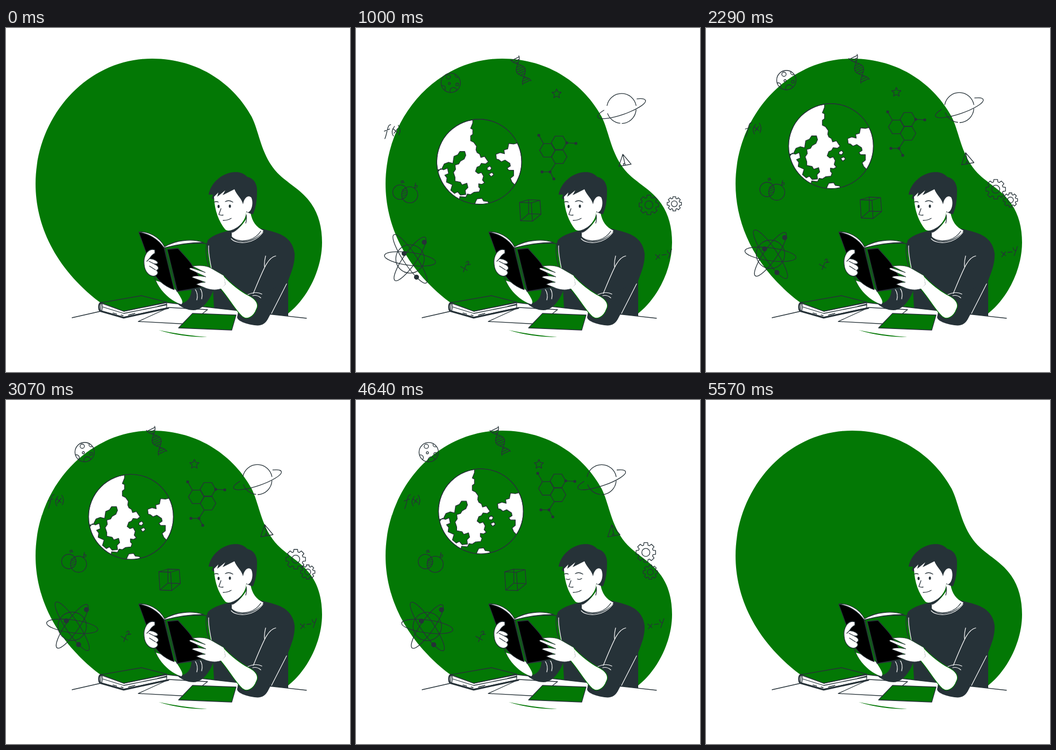
Recreate the animation shown at these times as an HTML page. Size 640 by 640 pixels, loop 5930 ms.

```html
<!DOCTYPE html>
<html lang="en">
<head>
<meta charset="utf-8">
<title>Reading about science</title>
<style>
  html, body { margin: 0; width: 100%; height: 100%; overflow: hidden; background: #fff; }
  svg { display: block; width: 100%; height: 100%; }
  .line { fill: none; stroke: #263238; stroke-width: 1.3; stroke-linecap: round; stroke-linejoin: round; }
  .thin { fill: none; stroke: #fff; stroke-width: 1.2; stroke-linecap: round; }
  .green { fill: #037805; }
  .dark { fill: #263238; }
  .white { fill: #fff; }
  .edge { stroke: #263238; stroke-width: 1.3; stroke-linejoin: round; }
</style>
</head>
<body>
<svg viewBox="0 0 640 640">
  <defs>
    <clipPath id="globeClip"><circle r="79"/></clipPath>
    <clipPath id="moonClip"><circle r="18"/></clipPath>
    <clipPath id="lensClip"><circle r="13.5"/></clipPath>
  </defs>

  <path class="green" d="M177 512C90 447 55 365 55 290C55 165 150 57 272 57C360 57 425 106 457 165C471 193 474 232 500 264C520 288 549 299 568 327C582 347 588 372 588 399C588 447 563 501 525 531L520 535 300 511Z"/>
  <path class="green" d="M284 562Q325 571 375 575Q325 575 284 562Z"/>

  <g id="items" class="line"></g>

  <g id="table">
    <path class="line" d="M123 539L176 527M300 511L559 540"/>
    <path class="white edge" d="M246 546L303 520 375 524 340 551Z"/>
    <path class="green edge" d="M347 531L428 534 420 562 321 558Z"/>
    <path class="white edge" d="M177 512L219 527 299 511V521L219 538 176 526Z"/>
    <path class="green edge" d="M177 511L252 498 299 510 219 527Z"/>
    <path class="line" d="M180 519L219 531 299 515M282 518L298 514M199 530L206 532M214 534L218 535M228 534L240 531"/>
    <path class="line" style="stroke-width:3" d="M178 511Q173 511 173 519T177 527L219 539 302 521"/>
    <path class="line" d="M178 511Q181 518 178 526"/>
  </g>

  <g id="man">
    <path class="dark" d="M421 376C404 379 386 384 376 394C370 402 378 425 383 450L387 521 525 536V470C535 445 537 435 537 420C534 397 520 386 500 380C485 375 472 373 462 370Z"/>
    <path class="white" d="M447 340L455 344C458 360 465 370 479 377C467 397 430 404 420 388V380Q435 375 447 355Z"/>
    <path class="thin" d="M419 392C430 404 462 402 478 380"/>
    <path class="line" d="M419 388C431 401 461 398 474 378"/>
    <path class="dark" d="M377 310C380 291 400 268 428 268C440 268 447 275 449 277C463 280 468 293 467 306C467 325 463 340 459 347L446 342C444 356 437 374 421 381L388 320 383 317 385 310Z"/>
    <path class="white" d="M387 314L395 306 393 314 408 302 403 311 425 300C429 311 438 316 441 328C443 316 450 310 456 315C461 323 458 341 450 343L447 341C447 358 433 371 422 375Q413 379 408 375C396 360 388 340 387 314Z"/>
    <path class="line" d="M447 348Q448 357 446 363M387 324Q392 322 395 324M408 323Q415 319 422 324M400 336L396 347Q400 349 404 348M404 358Q413 358 419 354"/>
    <g id="eyes" class="dark"><ellipse cx="395.500" cy="332" rx="2" ry="3"/><ellipse cx="416.500" cy="331.500" rx="2" ry="3"/></g>
    <path id="lids" class="line" d="M391 333Q395 335 398 333M412 333Q416 335 420 332"/>

    <path class="dark" d="M320 514C336 514 346 503 346 485L364 480 386 487C380 505 366 525 349 525C337 525 327 520 320 514Z"/>
    <path class="green edge" d="M275 462C285 486 300 502 324 513Q344 511 346 486L313 488 283 460Z"/>
    <path class="white" d="M279 470C287 489 306 508 326 514C332 510 324 500 318 490C309 478 297 476 279 470Z"/>
    <path class="thin" d="M352 486Q358 495 355 506M360 483Q367 491 364 504M377 405C376 420 380 435 382 447"/>

    <path class="green edge" d="M295 408C320 402 350 400 373 401C370 420 376 445 382 452L371 483 318 490Z"/>
    <path class="white edge" d="M248 379C264 379 285 387 295 407C315 395 345 391 368 399C340 399 320 403 295 409Z"/>
    <path class="edge" d="M247 380C265 382 283 393 294 409L313 487C293 480 279 466 273 452Z"/>
    <path class="edge" d="M300 412L320 410C333 425 344 435 347 443L371 481 319 490Z"/>
    <path class="white edge" d="M277 413C264 408 255 425 257 440C258 453 267 464 277 461C283 459 284 454 280 451L283 449Q286 444 276 439L281 439Q286 435 273 430L267 429Q271 422 277 419Z"/>
    <path class="line" d="M267 429L262 434M276 439L266 434M278 450L267 443"/>

    <path class="dark" d="M449 497C462 487 474 491 476 493L522 474C514 494 498 520 489 538C483 551 475 555 462 553C447 551 430 545 430 538L433 522Z"/>
    <path class="white" style="stroke:#037805;stroke-width:1.3" d="M380 446L404 460C418 476 437 490 450 497C465 504 471 514 466 523C461 537 449 544 440 537C428 527 417 506 400 486Z"/>
    <path class="white edge" d="M347 443C360 441 372 442 380 446L404 460 408 477 400 485C390 489 377 487 367 482L354 477Q361 473 371 473L346 464Q349 459 372 463L342 449Q340 445 347 447L371 455Z" style="stroke-width:.8"/>
    <path d="M380 447L405 461 408 477 401 485 385 484Z" class="white"/>
    <path class="thin" d="M502 424C487 427 480 446 460 494M481 444C480 436 482 428 483 424M522 476L494 531M450 496Q465 489 476 495M459 498Q467 496 474 502"/>
  </g>
</svg>

<script>
const LOOP = 5930;
const layer = document.getElementById('items');
const eyes = document.getElementById('eyes');
const lids = document.getElementById('lids');
const clamp = v => Math.max(0, Math.min(1, v));
const path = (d, extra = '') => `<path d="${d}" ${extra}/>`;
const circle = (x, y, r, extra = '') => `<circle cx="${x}" cy="${y}" r="${r}" ${extra}/>`;
const dot = (x, y, r) => circle(x, y, r, 'class="dark"');

// Closed polygon from polar points: at(i) gives [radius, angle].
function polar(count, at, cx = 0, cy = 0) {
  const points = Array.from({ length: count }, (_, i) => {
    const [r, a] = at(i);
    return (cx + r * Math.cos(a)).toFixed(2) + ' ' + (cy + r * Math.sin(a)).toFixed(2);
  });
  return path('M' + points.join('L') + 'Z');
}

const hexagon = (x, y) => polar(6, i => [14.5, i * Math.PI / 3], x, y);

function gear(r, hole) {
  const offsets = [-.29, -.19, .19, .29];
  return polar(32, i => [i % 4 % 3 ? r : r * .76, (i >> 2) * Math.PI / 4 + offsets[i % 4]]) + circle(0, 0, hole);
}

function helix() {
  let a = '', b = '', rungs = '';
  for (let s = -26; s <= 26; s++) {
    const w = -8.5 * Math.cos(Math.PI * s / 26);
    a += (a ? 'L' : 'M') + s + ' ' + w.toFixed(2);
    b += (b ? 'L' : 'M') + s + ' ' + (-w).toFixed(2);
    if (s % 4 === 0) rungs += `M${s} ${w.toFixed(2)}V${(-w).toFixed(2)}`;
  }
  return `<g transform="rotate(64)">${path(a + b + rungs)}</g>`;
}

const orbit = (r, angle) => `<ellipse rx="${r}" ry="12" transform="rotate(${angle})"/>`;

const globe = circle(0, 0, 79, 'fill="#fff"') + '<g clip-path="url(#globeClip)" class="green edge">' +
  path('M-12-82L-12-72-16-62-12-60-12-51-16-48-16-39-10-36-5-29-6-22-4-17 1-14 3-8 10-10 14-4 17 0 12 4 4 3 1 8-4 10-7 18-2 22 4 20 8 27 6 34 10 39 5 42-1 41-1 47 2 50 0 56-10 57-16 61-22 60-25 66-36 65-40 85H50L66 43 61 38 58 31 64 26 64 16 55 16 52 12 58 8 57 3 48-3 41 0 36-4 32-5 31-14 39-17 47-15 46-22 53-24 55-34 64-33 72-35 85-38 60-80Z') +
  path('M-82 16L-70 14-65 4-57 1-49 3-47-10-40-13-36-19-27-19-25-12-28-5-35-1-38 4-45 6-44 14-48 20-45 29-45 36-35 38-32 43-23 40-21 48-26 53-25 61-35 62-40 56-46 59-53 53-50 43-61 38-60 30-64 25-57 22-59 12-66 15-72 13-78 20Z') +
  path('M15 11L20 8 23 12 20 16 15 15ZM18 23L24 20 27 24 22 28ZM-9 82L-7 75-4 69 5 68 8 73 16 74 20 82Z', 'fill="#fff"') +
  '</g>' + circle(0, 0, 79);

const moon = circle(0, 0, 18) + '<g clip-path="url(#moonClip)">' + circle(-4.5, -11, 4) + circle(-2.5, 1, 2) +
  circle(12, 3, 2.6) + circle(12, -14, 4) + circle(-15, 10, 5) + circle(5, 15, 6.5) + '</g>';

const saturn = path('M-27-6A27.500 27.500 0 0 1 27-6M-26 9A27.500 27.500 0 0 0 -3 27M1 27.500A27.500 27.500 0 0 0 27 2') +
  '<g transform="rotate(-19)">' + path('M-47 0A47 11 0 0 0 47 0A47 11 0 0 0 33-8M-47 0A47 11 0 0 1-32-8') + '</g>';

const molecule = hexagon(37.5, 14) + hexagon(16, 28) + hexagon(38, 40) +
  path('M0 0L8.500 15M52 14L69 15M31 52.500L21 68H6M21 68L28 81') +
  dot(0, 0, 2) + dot(52, 14, 2) + dot(69, 15, 2) + dot(21, 68, 2) + dot(6, 68, 2) + dot(28, 81, 2);

const cube = path('M-20-15L2-14 4 20-18 19ZM-3-20L18-19 20 7-3 6ZM-20-15L-3-20M2-14L18-19M4 20L20 7M-18 19L-3 6');

const atom = circle(0, 0, 26.5) + orbit(48, 7.5) + orbit(54, 56) + orbit(49, -55) +
  dot(26.5, -31, 4) + dot(-11, -10, 4) + dot(12, 34, 4);

const venn = circle(0, 0, 13.5) + circle(18, 5, 15) +
  `<g clip-path="url(#lensClip)">${path('M4-4L14-9M3 0L14-5M3 4L14-1M4 8L14 3M5 12L14 7')}</g>` +
  path('M6-21Q1-22 2-18Q4-15 6-21Q5-17 8-18M29-17L27-8Q33-8 32-12Q30-14 28-11');

const items = [];
// early and rest are positions at 0.57 s and 1.57 s; drift is px/s along the main axis.
function add(markup, early, rest, drift, out, main = 0) {
  const node = document.createElementNS('http://www.w3.org/2000/svg', 'g');
  node.innerHTML = markup;
  layer.append(node);
  items.push({ node, early, rest, drift, out, main });
}

add(moon, [219.5, 119], [152.5, 97], -4.1, 5140);
add(helix(), [337, 88], [289, 76], -5.8, 5130);
add(polar(10, i => [i % 2 ? 4.2 : 9, i * Math.PI / 5 - Math.PI / 2]), [400.5, 132.5], [357.5, 119.5], -4.7, 5300);
add(saturn, [529, 155.5], [474.5, 148.5], -4.5, 5440);
add(path('M-3.500-11.500L-11 11 12 7ZL1 9M-2 9.500L-2.500 6 .5 5.500'), [521.5, 256], [488, 243.5], -2.1, 5480);
add(molecule, [347, 274], [338, 159.5], -4.9, 5390, 1);
add(cube, [351.5, 356], [309, 334.5], -3.1, 5410);
add(gear(18.5, 7.5), [564.5, 375.5], [539, 303.5], -4.9, 5540, 1);
add(gear(13.5, 5.5), [629, 350.5], [571, 320], -6.4, 5570);
add(path('M-15 1L-7 8M-7 1L-14 10M-3 2L5 1M7-7Q8 0 13-2M15-9L9 8'), [582.5, 437], [566, 415.5], -2.3, 5510);
add(path('M-8 0L4 7M2-3L-3 10M2-7Q5-12 7-8Q7-5 4-3L10-4'), [180, 458], [216, 439.5], 4.1, 5300);
add(atom, [71.5, 458], [117, 421], 4.1, 5270);
add(venn, [29.5, 322], [110.5, 300.5], 4.3, 5260);
add(path('M-2-13C-9-13-8 2-13 13M-14-1L-4-5M5-10Q-3 0 3 8M3-5L11 2M11-6L4 3M12-12Q18-3 13 6'), [39, 206], [83, 189], 5.8, 5220);
add(globe, [218.5, 298.5], [232.5, 222], -3.1, 5360, 1);

function draw(t) {
  const leave = clamp((t - 4050) / 1520);
  const mainShift = (clamp((1450 - t) / 1450) * 1450 / 880) ** 1.6 + 1.4 * leave ** 2 * (2.2 * leave - 1.2);
  const sideShift = (clamp((1400 - t) / 1400) * 1400 / 830) ** 2 + leave ** 5;
  for (const { node, early, rest, drift, out, main } of items) {
    const [x, y] = rest.map((p, axis) => axis === main
      ? p + drift * (t - 1570) / 1000 + (early[axis] - p + drift) * mainShift
      : p + (early[axis] - p) * sideShift);
    node.setAttribute('transform', `translate(${x.toFixed(2)} ${y.toFixed(2)})`);
    node.setAttribute('opacity', clamp((t - 60) / 200) * clamp((out - t) / 120));
  }
  const blink = t >= 4570 && t < 4720;
  eyes.setAttribute('visibility', blink ? 'hidden' : 'visible');
  lids.setAttribute('visibility', blink ? 'visible' : 'hidden');
}

const start = performance.now();
function frame() {
  draw((performance.now() - start) % LOOP);
  requestAnimationFrame(frame);
}
frame();
</script>
</body>
</html>
```
